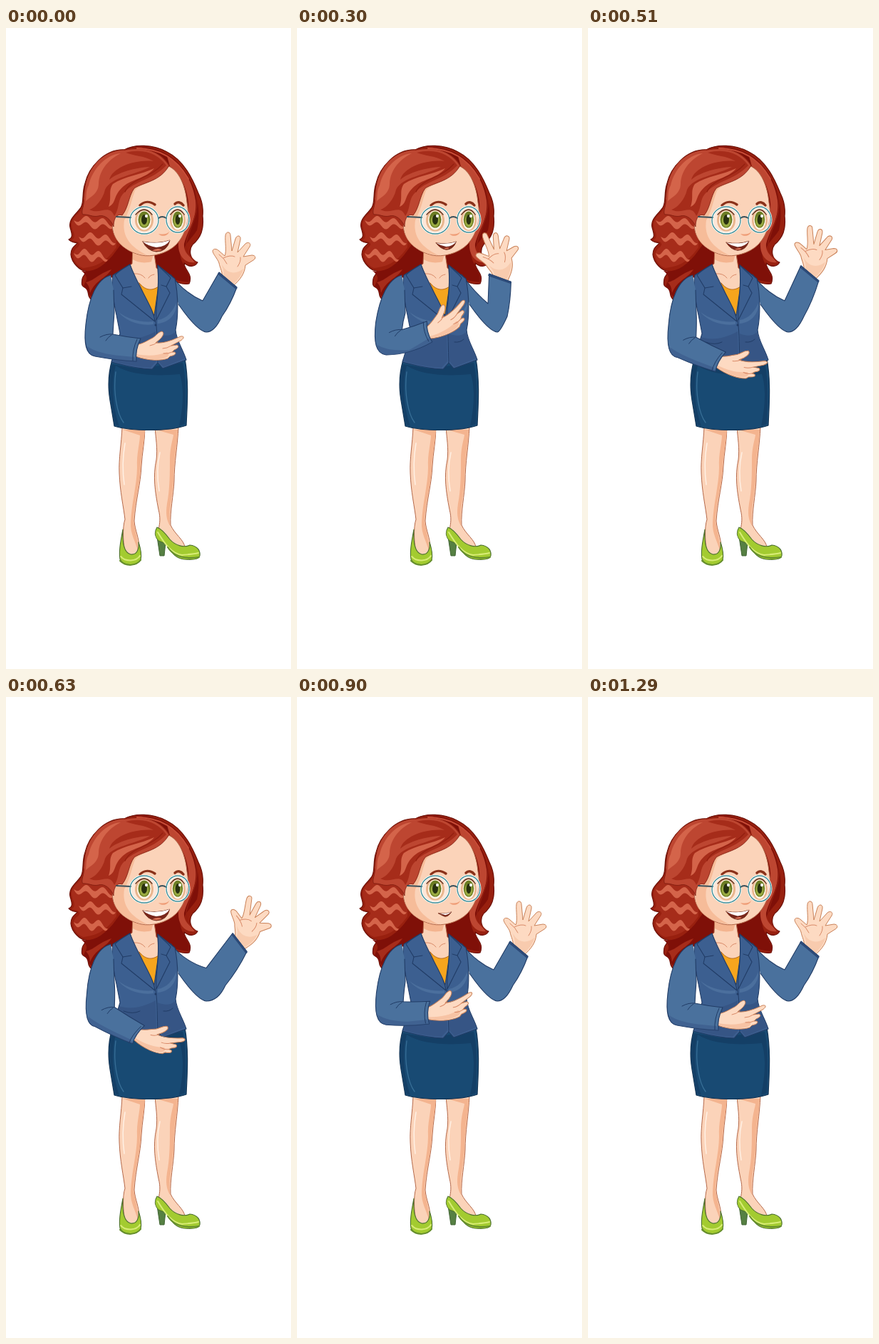
These frames come from a looping animation (400 by 900 pixels, 1.8 s). An HTML page:

```html
<!DOCTYPE html>
<html lang="en">
<head>
<meta charset="utf-8">
<title>Waving woman</title>
<style>
html, body { margin: 0; width: 100%; height: 100%; overflow: hidden; background: #fff; }
svg { display: block; width: 100vw; height: 100vh; }
path, ellipse { stroke-linejoin: round; stroke-linecap: round; }
.skin { fill: #fbd3b9; stroke: #b5694a; stroke-width: 1; }
.hand { fill: #fddac2; stroke: #c98158; stroke-width: 1; }
.shade { fill: #f4b48f; }
.sline { fill: none; stroke: #d98a68; stroke-width: 1; }
.sleeve { fill: #4a719d; stroke: #213c66; stroke-width: 1.1; }
.coat { fill: #3c5f90; stroke: #213c66; stroke-width: 1.1; }
.dark { fill: #365585; }
.seam { fill: none; stroke: #213c66; stroke-width: 1; }
.h1 { fill: #7f1008; }
.h2 { fill: #a62c1a; }
.h3 { fill: #bd4631; }
.h4 { fill: #d4644a; }
.hl { fill: none; stroke: #931f10; stroke-width: 1.3; }
.shoe { fill: #a3cb30; stroke: #4c7030; stroke-width: 1.1; }
.lit { fill: none; stroke: #d8ec76; stroke-width: 2; }
</style>
</head>
<body>
<svg viewBox="0 0 400 900">
  <g id="hair">
    <path fill="#98200f" stroke="#6d1108" stroke-width="1.2" d="M166 171C180 163 206 163 226 174C250 186 262 212 270 232C276 244 277 254 276 264C278 282 274 294 262 304C256 312 258 326 269 329C264 337 256 335 250 330C250 340 263 345 257 359C240 362 225 350 210 330L176 338C160 340 138 352 126 365C120 372 120 378 122 383C113 378 117 370 113 366C108 362 105 364 107 352C108 347 113 345 112 341C104 341 92 330 91 318C91 308 97 306 100 302C96 301 91 301 88 297C95 294 92 288 90 280C87 268 100 260 105 252C110 244 106 232 111 218C116 196 138 170 166 171Z"/>
    <path class="h2" d="M111 222C112 240 111 250 101 261C90 269 91 280 95 287C97 293 95 296 92 298C104 300 107 303 98 310C89 320 98 333 108 337C122 335 136 334 155 308L156 262L150 235Z"/>
    <path class="h1" d="M106 341C124 344 138 333 150 319L164 300L180 318L178 345L140 352C128 360 120 370 122 380C114 372 114 366 109 363C112 354 118 351 106 341Z"/>
    <path class="h2" d="M112 357C125 354 128 346 148 339C140 352 126 353 118 372C117 364 116 361 112 357Z"/>
    <g id="locks" class="h4"></g>
    <path class="h1" d="M190 167C224 168 248 190 260 216C272 242 272 266 268 284C262 294 252 302 250 310L239 303L252 280L248 218L228 190Z"/>
    <path class="h1" d="M200 318L243 300C245 318 243 322 250 333C252 342 261 349 256 357C240 356 226 349 210 342Z"/>
    <path class="h3" d="M226 180C248 192 262 216 266 242C269 268 254 285 250 303C249 316 258 320 265 329C249 331 241 317 242 302C246 284 258 268 256 245C254 224 244 204 230 194Z"/>
    <path class="hl" d="M266 231C274 260 256 282 253 302C252 313 259 322 266 328"/>
  </g>

  <g id="waveHand">
    <path class="hand" d="M303 352C305 343 300 337 299 330C297 324 290 317 290 313C291 309 296 310 299 313L307 320C310 313 307 300 308 291C309 285 315 286 315 291L317 313L322 296C324 290 330 291 329 297L325 315L335 304C339 299 345 302 342 307L333 321L345 319C351 319 351 324 347 326L336 333C335 345 329 353 319 362Z"/>
    <path fill="#f8cbae" d="M304 351C308 343 304 338 303 332C310 346 324 346 333 338C331 347 326 353 318 360Z"/>
    <path class="sline" d="M299 318Q307 324 310 331M305 323Q315 318 321 321M329 322Q330 328 325 335"/>
  </g>
  <path id="waveArm" class="sleeve"/>
  <path id="waveCuff" fill="none" stroke="#2c4a78" stroke-width="3"/>

  <g id="legs">
    <path class="skin" d="M163 560C162 585 158 604 159 625C160 652 165 672 167 690C163 700 164 730 169 741C177 750 186 743 187 731C187 715 181 706 180 692C182 662 189 640 190 615C191 596 195 580 195 560Z"/>
    <path class="shade" d="M164 564L195 564C194 582 190 597 189 618C188 644 180 664 179 692C181 706 186 720 185 734C182 721 174 710 175 694C176 668 184 640 184 617C183 598 188 582 188 572Z"/>
    <path class="skin" d="M209 560C210 575 213 590 211 606C206 630 209 650 214 676C217 688 216 695 214 704C220 719 235 733 251 729C250 719 237 711 231 698C230 678 235 657 236 636C236 610 241 586 242 560Z"/>
    <path class="shade" d="M210 564L241 564C240 586 235 610 235 636C234 656 228 676 230 699C225 690 224 681 226 668C230 648 230 624 230 606C230 588 235 575 235 571Z"/>
    <path fill="none" stroke="#fff0e4" stroke-width="1.5" d="M167 583C163 606 164 627 166 641M216 596C211 618 213 638 215 650"/>
    <path class="shoe" d="M164 704C161 720 158 735 160 746C165 756 183 756 189 747C191 739 188 728 186 722C187 733 183 740 175 739C166 737 163 723 164 704Z"/>
    <path fill="#568043" stroke="#3f6332" d="M212 714L216 741L222 741L224 722Z"/>
    <path class="shoe" d="M212 701C207 709 210 716 214 720L224 724C232 735 236 744 250 746C261 747 271 746 272 741C273 733 268 727 258 726C250 730 238 727 230 718C224 710 218 703 212 701Z"/>
    <path class="lit" d="M161 742C168 750 183 749 188 741M213 708C223 725 233 738 247 740C257 739 263 739 270 737"/>
    <path fill="none" stroke="#668f2c" stroke-width="2" d="M160 748C169 757 183 755 189 747M227 729C237 745 257 745 271 743"/>
  </g>

  <g id="skirt">
    <path fill="#184a73" stroke="#123252" stroke-width="1.2" d="M149 466C143 486 143 505 146 523L152 559C175 566 228 567 253 558C254 533 257 498 251 464Z"/>
    <path fill="#143f66" d="M149 472L184 478L248 470C254 495 252 530 251 556L243 559C249 530 250 506 244 486C213 489 175 488 154 474C147 500 150 534 159 559L153 557L147 520C143 500 144 485 149 472Z"/>
    <path fill="none" stroke="#376e96" stroke-width="1.3" d="M154 483C150 512 156 542 165 554"/>
  </g>

  <g id="body">
    <path class="skin" d="M178 307L177 331L167 338L207 407L227 347L211 337L207 311Z"/>
    <path class="shade" d="M178 312C190 320 199 321 207 317L204 328C194 331 184 329 178 325Z"/>
    <path class="sline" d="M179 345Q190 344 195 351M208 346Q202 347 200 351"/>
    <path fill="#f6a51d" stroke="#b66a18" d="M187 358C195 368 204 370 214 363L218 370L207 406Z"/>
    <path class="coat" d="M174 332L150 347C147 362 151 385 155 403L160 429L148 469C164 473 180 478 205 479L213 470L220 478L253 466C248 450 239 439 238 424C242 405 242 375 237 352L213 333L214 362L208 404L180 354Z"/>
    <path class="dark" d="M159 434C174 439 192 436 210 426L211 468L203 477C183 476 165 472 150 468ZM213 429C222 433 231 433 237 427L251 464L221 476L213 467Z"/>
    <path fill="#4b6f9d" d="M158 399C170 408 188 414 207 412L207 416C187 419 168 411 158 399ZM213 410C226 408 234 398 239 386C240 402 228 414 213 415Z"/>
    <path class="coat" d="M174 332C166 337 158 341 153 347L164 365L162 374L209 412C207 392 187 367 174 332ZM213 333C219 340 227 345 231 351L225 363L230 372L211 410C209 390 216 374 213 333Z"/>
    <path class="seam" d="M164 365L176 363M225 363L218 361M210 410C213 430 212 451 213 470M165 441Q178 446 188 441M221 441Q229 442 234 437"/>
    <circle cx="210" cy="417" r="1.5" fill="#213c66"/>
  </g>

  <g id="face">
    <path class="skin" d="M228 194C243 200 252 222 254 245C258 265 254 288 239 304C226 317 204 322 190 319C172 315 154 303 150 284C148 270 154 260 162 262C170 245 172 232 180 222C200 216 218 208 228 194Z"/>
    <path class="shade" opacity=".75" d="M228 196C212 216 190 218 181 228C176 242 174 256 166 270C163 290 171 306 198 319C171 317 152 301 151 283C150 269 155 263 163 264C171 246 172 231 181 222C200 216 218 208 228 196Z"/>
    <path fill="none" stroke="#8a3119" stroke-width="3.4" d="M188 249C194 243 202 243 209 248M237 247C241 243 246 245 249 249"/>
    <path fill="#ef9d77" d="M214 289C219 294 227 292 229 286C225 290 221 290 214 289Z"/>
    <g id="lenses" fill="#fff" fill-opacity=".45" stroke="#fff" stroke-width="3"></g>
    <g id="eyes"></g>
    <path id="mouth" fill="#78261a" stroke="#79301d" stroke-width="1"/>
    <path id="tongue" fill="#dd7458"/>
    <path id="teeth" fill="#fff"/>
  </g>

  <g id="crown">
    <path class="h3" stroke="#7b1a0d" stroke-width=".8" d="M111 222C116 192 140 171 166 171C192 165 216 172 229 193C216 216 194 216 180 225C172 236 172 252 163 263C154 260 151 270 151 279C146 266 136 262 130 264C121 266 116 261 108 262C104 258 111 248 109 240Z"/>
    <path class="h2" d="M168 175C194 168 215 178 225 193C205 214 181 214 166 231C156 240 160 253 152 264C145 246 132 263 117 255C125 253 136 241 139 227C147 209 183 206 202 195C182 196 158 202 145 213C149 196 181 184 207 187C194 179 180 180 168 175Z"/>
    <path class="h4" d="M116 221C121 199 139 178 161 176C141 186 131 202 130 218C130 232 120 236 112 243C113 234 112 228 116 221ZM150 219C166 208 190 206 208 197C196 212 174 212 162 225C150 237 155 246 144 251C149 237 143 229 150 219Z"/>
    <path class="hl" d="M166 171C197 166 217 173 229 193M220 191C203 211 175 211 167 230"/>
    <path fill="none" stroke="#c74c37" stroke-width="2" d="M184 169C216 169 240 184 256 212"/>
  </g>

  <g id="glasses" fill="none" stroke="#3f8f98" stroke-width="1.4">
    <path stroke="#36505c" stroke-width="1.8" d="M155 265L175 266M214 267Q219 263 225 267"/>
  </g>

  <g id="lowHand">
    <path class="hand" d="M-4 -7C5 -8 12 -13 20 -17C25 -20 27 -25 33 -26C37 -24 34 -19 30 -15L24 -10C36 -9 48 -14 59 -19C65 -20 64 -16 59 -13L46 -6L54 -7C58 -5 55 -2 50 0L47 3L51 3C54 6 49 8 44 9L41 12C33 15 15 16 -4 9Z"/>
    <path fill="#f7c3a4" d="M-3 6C14 9 28 8 40 3C44 5 43 9 38 11C26 15 10 13 -3 8Z"/>
    <path class="sline" d="M16 -6Q22 -7 27 -11M46 -6Q40 -2 34 -2M47 3Q41 6 35 5"/>
  </g>
  <path id="lowArm" class="sleeve"/>
  <path id="lowShade" class="dark" opacity=".5"/>
  <path id="lowFold" class="seam"/>
</svg>
<script>
const $ = id => document.getElementById(id);
const put = (id, d) => $(id).setAttribute("d", d);
const LOOP = 1800, STEP = 30;

// Key points as [time, value], joined by half cosine waves
const swing = [[30, 0], [285, -20], [690, 14], [900, 0]];
const lift = [[200, 0], [440, 10], [900, 0]];
const turn = [[30, 0], [285, -26], [585, 24], [870, -7], [1110, -57], [1290, 0]];
const smile = [[30, 1], [420, .4], [600, 1], [900, .05], [1140, .72]];
const lids = [[330, 1], [420, .1], [510, 1]];

function at(keys, t) {
  const i = keys.findIndex(k => k[0] > t);
  if (i < 0) return keys[keys.length - 1][1];
  if (i === 0) return keys[0][1];
  const [[t0, a], [t1, b]] = keys.slice(i - 1, i + 1);
  return a + (b - a) * (1 - Math.cos(Math.PI * (t - t0) / (t1 - t0))) / 2;
}

function rotate(x, y, deg) {
  const a = deg * Math.PI / 180, c = Math.cos(a), s = Math.sin(a);
  return [x * c - y * s, x * s + y * c];
}

const oval = (x, y, rx, ry, fill) =>
  `<ellipse cx="${x}" cy="${y}" rx="${rx}" ry="${ry}" fill="${fill}"/>`;

function eye(x, s) {
  return oval(x, 270, 10 * s, 13.5, "#fff6e6") + oval(x, 269, 8.5 * s, 11.5, "#6c7d24") +
    oval(x, 271, 6.3 * s, 8.5, "#9aab42") + oval(x, 269, 4 * s, 7, "#29310f") +
    oval(x + 3, 264, 2, 2.2, "#fff") +
    `<path d="M${x - 12 * s} 262Q${x} 248 ${x + 11 * s} 262" fill="none" stroke="#5b2b18" stroke-width="1.3"/>`;
}

// A wavy band of hair that narrows at both ends
function lock(x, y, width) {
  const top = [], low = [];
  for (let i = 0; i <= 24; i++) {
    const u = i / 24, px = x + u * width;
    const py = y + u * 7 + 4 * Math.sin(u * 15), half = 5 * Math.sin(Math.PI * u) ** .6;
    top.push(`${px} ${py - half}`);
    low.unshift(`${px} ${py + half}`);
  }
  return `<path d="M${top.concat(low).join("L")}Z"/>`;
}

function build() {
  for (let i = 0; i < 3; i++) $("locks").innerHTML += lock(95 + i % 2 * 7, 270 + i * 23, 56 - 4 * i);
  const rings = oval(194, 270, 20, 19, "") + oval(241, 269, 16, 18, "");
  const plain = rings.replace(/ fill=""/g, "");
  $("lenses").innerHTML = plain;
  $("glasses").innerHTML += plain;
  $("lenses").insertAdjacentHTML("afterend", oval(194, 270, 13, 15.5, "#e9b58e") + oval(241, 270, 11, 15, "#e9b58e"));
  $("eyes").innerHTML = eye(194, 1) + eye(241, .85);
}

function drawWave(t) {
  const r = at(swing, t), x = 320.5 + 2 * r, y = 316 - at(lift, t);
  const [ax, ay] = rotate(-21.5, 27, r), [bx, by] = rotate(3.5, 48, r);
  const a = [x + ax, y + ay], b = [x + bx, y + by];
  const elbow = 303 + .4 * r;
  $("waveHand").setAttribute("transform", `translate(${x} ${y}) rotate(${r}) translate(-320.5 -316)`);
  put("waveArm", `M231 346Q249 371 ${276 + .4 * r} ${383 - .2 * r}L${a}L${b}Q${(b[0] + elbow) / 2 + 2} ${(b[1] + 405) / 2 + 3} ${elbow} 405Q${elbow - 10} 427 281 427Q268 425 242 388`);
  put("waveCuff", `M${a[0]} ${a[1] + 2}L${b[0] - 1} ${b[1] + 1}`);
}

function drawLow(t) {
  const r = at(turn, t), x = 186, y = 452 + r;
  const [dx, dy] = rotate(-3, 16 - Math.abs(r) * .05, r);
  const bx = x + dx, by = y + dy, tx = x - dx, ty = y - dy;
  const cx = 150 + .1 * r, cy = 430 + .25 * r, out = 111 + .06 * r, ey = 461 + .08 * r;
  const mx = (125 + bx) / 2, my = (ey + by) / 2 + Math.max(2, -.36 * r);
  $("lowHand").setAttribute("transform", `translate(${x} ${y}) rotate(${r})`);
  put("lowArm", `M147 347C128 352 116 378 ${out + 1} ${ey - 45}C${out - 2} ${ey - 18} ${out + 1} ${ey - 2} 125 ${ey}Q${mx} ${my} ${bx} ${by}Q${x - 5} ${y} ${tx} ${ty}Q${(tx + cx) / 2} ${(ty + cy) / 2 + 1} ${cx} ${cy}Q${cx + 1} 412 152 400L151 368`);
  put("lowShade", `M${out + 3} ${ey - 14}Q127 ${ey - 5} ${mx} ${my - 7}L${bx - 3} ${by - 6}L${bx} ${by}Q${mx} ${my} 125 ${ey}Q${out + 3} ${ey - 2} ${out + 3} ${ey - 14}Z`);
  put("lowFold", `M${cx} ${cy}q-9 -1 -18 4M${cx - 2} ${cy + 1}q-5 3 -8 8M${tx - 5} ${ty + 1}Q${x - 9} ${y} ${bx - 5} ${by - 1}`);
}

function drawMouth(t) {
  const m = at(smile, t);
  const lx = 199 - 7 * m, ly = 304 - 4 * m, rx = 216 + 14 * m, ry = 302 - 4 * m;
  const mid = (lx + rx) / 2, end = 308 + 6 * m;
  const top = `M${lx} ${ly}Q${mid + 2} ${305 - m} ${rx} ${ry}`;
  put("mouth", `${top}Q${rx - 4} ${end} ${mid} ${end}Q${lx + 6} ${end - 1} ${lx} ${ly}Z`);
  put("teeth", `${top}Q${rx - 5} ${306 + m} ${mid} ${306 + 2 * m}Q${lx + 7} ${305 + m} ${lx} ${ly}Z`);
  put("tongue", `M${mid - 6 * m} ${end - 1.5}Q${mid + 2} ${end - 5 * m - 1} ${mid + 8 * m} ${end - 2.5}Q${mid + 3} ${end} ${mid - 6 * m} ${end - 1.5}Z`);
}

function draw(now) {
  const t = Math.floor(now % LOOP / STEP) * STEP;
  drawWave(t);
  drawLow(t);
  drawMouth(t);
  $("eyes").setAttribute("opacity", at(lids, t));
}

let start;
function tick(now) {
  start ??= now;
  draw(now - start);
  requestAnimationFrame(tick);
}
build();
draw(0);
requestAnimationFrame(tick);
</script>
</body>
</html>
```
